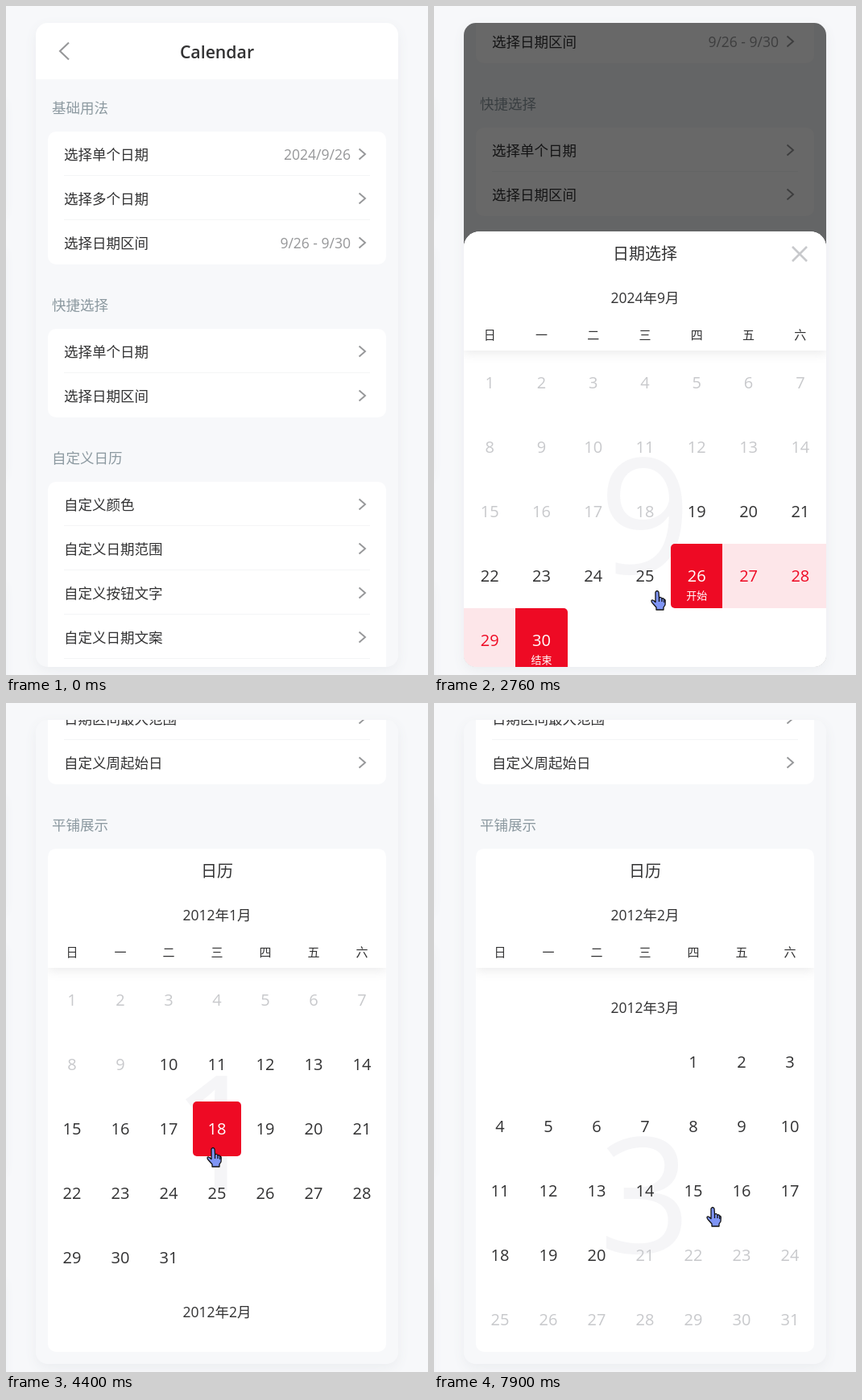
An HTML page for the animation above (8 s loop, 524 by 831 pixels).

```html
<!DOCTYPE html>
<html lang="zh-CN">
<head>
<meta charset="utf-8">
<title>Calendar</title>
<style>
  * { box-sizing: border-box; }
  html, body { margin: 0; width: 100%; height: 100%; overflow: hidden; }
  body {
    position: relative; background: #f7f8fa; color: #323233;
    font: 17.5px/55px 'Open Sans', 'Noto Sans CJK SC', 'Noto Sans CJK', sans-serif;
  }
  .side { position: absolute; left: -60px; width: 56px; box-shadow: 0 5px 15px #ebedf0; }
  .phone {
    position: absolute; left: 37px; top: 21px; width: 450px; height: 800px;
    border-radius: 15px; box-shadow: 0 5px 15px #ebedf0;
  }
  .screen { position: absolute; inset: 0; overflow: hidden; border-radius: 15px; background: #f7f8fa; }
  .nav {
    height: 70px; background: #fff; text-align: center;
    font-weight: 600; font-size: 21.25px; line-height: 71px;
  }
  .nav svg { position: absolute; left: 28px; top: 23px; }
  svg { fill: none; stroke: #969799; stroke-width: 1.9; overflow: visible; }
  h2 {
    margin: 0; padding: 23px 20px 0; height: 65px; line-height: 24px;
    font-size: 17.5px; font-weight: 400; color: rgba(69, 90, 100, .6);
  }
  .card + h2 { height: 80px; padding-top: 38px; }
  .card { margin: 0 15px; border-radius: 10px; background: #fff; overflow: hidden; }
  .row { position: relative; height: 55px; padding: 0 20px; line-height: 56px; }
  .row + .row::before {
    content: ''; position: absolute; left: 20px; right: 20px; top: -1px; height: 1px; background: #f4f5f6;
  }
  .row span { position: absolute; right: 44px; color: #969799; }
  .row svg { position: absolute; left: 386px; top: 21px; }
  .cal { position: relative; background: #fff; overflow: hidden; text-align: center; }
  .head {
    position: relative; z-index: 1; height: 147.5px; background: #fff;
    box-shadow: 0 2.5px 12.5px rgba(125, 126, 128, .16);
  }
  .head .name { height: 55px; font-size: 20px; line-height: 56px; }
  .week { display: grid; grid-template-columns: repeat(7, 1fr); font-size: 15px; line-height: 37px; }
  .grid { position: relative; display: grid; grid-template-columns: repeat(7, 1fr); grid-auto-rows: 80px; }
  .mark {
    position: absolute; inset: 0; display: flex; align-items: center; justify-content: center;
    font-size: 200px; line-height: 1; color: rgba(242, 243, 245, .8);
  }
  .day { position: relative; z-index: 0; font-size: 20px; line-height: 80px; }
  .off { color: #c8c9cc; }
  .picked { color: #fff; }
  .picked::before {
    content: ''; position: absolute; z-index: -1; inset: 6px 0; border-radius: 5px; background: #ee0a24;
  }
  .mid { color: #ee0a24; background: #fde6e9; }
  .start, .end { color: #fff; background: #ee0a24; }
  .start { border-radius: 5px 0 0 5px; }
  .end { border-radius: 0 5px 5px 0; }
  .day small {
    position: absolute; left: 0; right: 0; bottom: 7px; font-size: 13px; line-height: 18px;
  }
  .shade { position: absolute; inset: 0; background: rgba(0, 0, 0, .7); }
  .popup {
    position: absolute; left: 0; top: 160px; width: 450px; height: 640px;
    border-radius: 20px 20px 0 0; overflow: hidden; background: #fff;
  }
  .popup .cal { height: 577.5px; }
  .close { position: absolute; z-index: 2; left: 408px; top: 19px; }
  .btn {
    position: absolute; left: 20px; top: 586px; width: 410px; height: 45px;
    border-radius: 23px; background: #ee0a24; color: #fff; text-align: center; line-height: 45px;
  }
  .btn.down { background: #d60920; }
  #tiled { height: 625px; }
  .cursor { position: absolute; left: 0; top: 0; }
  .cursor path { stroke: #111; stroke-width: 1.3; stroke-linejoin: round; }
</style>
</head>
<body>
<div class="side" style="top:115px;height:140px"></div>
<div class="side" style="top:300px;height:280px"></div>
<div class="side" style="top:715px;height:200px"></div>
<div class="phone"><div class="screen">
  <div id="page"></div>
  <div class="shade" id="shade"></div>
  <div class="popup" id="popup">
    <svg class="close" width="18" height="18" style="stroke:#c8c9cc;stroke-width:2.6"><path d="M0 0 18 18M18 0 0 18"/></svg>
    <div class="cal" id="range"></div>
    <div class="btn" id="btn">完成</div>
  </div>
</div></div>
<svg class="cursor" id="cursor" width="1" height="1">
  <g id="hand">
    <path fill="#7f95f5" d="M-2 1Q0-2 2 1L2.5 8Q5 6.5 6 9Q8 8 8.7 10.3Q10.6 10 10.2 13L10 17 8 20V23H-1V20L-5 15.5Q-8 12.5-6.5 11Q-5 10-2 13.5Z"/>
    <path d="M2.5 8V13M6 9V13M8.7 10.3V14"/>
  </g>
  <path id="arrow" fill="#8a86b8" d="M0 0V16L4 12.5 6.8 18.5 9.5 17.2 6.8 11.5H12Z"/>
</svg>
<script>
const $ = id => document.getElementById(id);
const LOOP = 8000;

const row = (text, value = '', id = '') => `<div class="row">${text}
  <span id="${id}">${value}</span>
  <svg width="9" height="14"><path d="M.5 .5 8 7 .5 13.5"/></svg></div>`;
const card = (title, rows) => `<h2>${title}</h2><div class="card">${rows.join('')}</div>`;
const span = '9/26 - 9/30';

$('page').innerHTML = `<div class="nav">
    <svg width="14" height="22" style="stroke-width:2.1"><path d="M13 1.5 2 12 13 22.5"/></svg>Calendar</div>` +
  card('基础用法', [row('选择单个日期', '2024/9/26'), row('选择多个日期'), row('选择日期区间', span)]) +
  card('快捷选择', [row('选择单个日期'), row('选择日期区间')]) +
  card('自定义日历', [
    row('自定义颜色'), row('自定义日期范围'), row('自定义按钮文字', span, 'chosen'),
    row('自定义日期文案'), row('自定义弹出位置'), row('日期区间最大范围'), row('自定义周起始日')
  ]) +
  '<h2>平铺展示</h2><div class="card cal" id="tiled"></div>';

const label = (y, m) => `${y}年${m}月`;

// Month grid; info(day) gives the class and the note of a day.
function month(y, m, info, titled) {
  const first = new Date(y, m - 1, 1).getDay();
  const count = new Date(y, m, 0).getDate();
  let days = '';
  for (let d = 1; d <= count; d++) {
    const [cls, note] = info(d);
    const column = d === 1 ? ` style="grid-column-start:${first + 1}"` : '';
    days += `<div class="day ${cls}" data-day="${m}-${d}"${column}>${d}${note ? `<small>${note}</small>` : ''}</div>`;
  }
  return (titled ? `<div>${label(y, m)}</div>` : '') +
    `<div class="grid"><div class="mark">${m}</div>${days}</div>`;
}

const calendar = (name, title, months) => `<div class="head"><div class="name">${name}</div>
  <div class="sub">${title}</div>
  <div class="week">${[...'日一二三四五六'].map(c => `<div>${c}</div>`).join('')}</div></div>
  <div class="months">${months}</div>`;

const rangeInfo = d => d < 19 ? ['off'] : d === 26 ? ['start', '开始'] :
  d === 30 ? ['end', '结束'] : d > 26 ? ['mid'] : [''];
$('range').innerHTML = calendar('日期选择', label(2024, 9),
  month(2024, 9, rangeInfo) + month(2024, 10, () => [''], true));
$('tiled').innerHTML = calendar('日历', label(2012, 1),
  month(2012, 1, d => [d < 10 ? 'off' : '']) +
  month(2012, 2, () => [''], true) +
  month(2012, 3, d => [d > 20 ? 'off' : ''], true));

const months = $('tiled').querySelector('.months');
const sub = $('tiled').querySelector('.sub');
const dayCell = key => $('tiled').querySelector(`[data-day="${key}"]`);

// Keys are [time, value, ...]
const pageKeys = [[250, 0], [480, 125], [760, 250], [3065, 250], [3240, 375],
  [3460, 500], [3680, 625], [3900, 750], [4150, 875]];
const monthKeys = [[4440, 0], [4640, 125], [4850, 250], [5080, 375], [6730, 375],
  [6920, 500], [7200, 625], [7440, 750], [7640, 750], [7890, 833]];
const cursorKeys = [[50, 474, 840], [320, 300, 560], [800, 255, 482], [1230, 253, 482],
  [1420, 249, 547], [1750, 250, 535], [2000, 245, 620], [2390, 268, 782], [2680, 268, 782],
  [2760, 277, 727], [3060, 253, 579], [3700, 253, 579], [4150, 257, 553], [4420, 257, 553],
  [5100, 258, 566], [5230, 258, 566], [5500, 203, 688], [5620, 203, 688], [5850, 322, 690],
  [6150, 322, 690], [6700, 351, 628], [7200, 351, 628], [7700, 346, 627]];
const pickKeys = [[0, '1-10'], [4230, '1-18'], [5560, '2-21'], [5900, '2-23']];
const arrowKeys = [[0, false], [1260, true], [1850, false], [2080, true], [2330, false]];

const clamp = u => Math.min(1, Math.max(0, u));
const step = (keys, t) => keys.filter(k => k[0] <= t).pop()[1];

function track(keys, t, i = 1) {
  const n = keys.findIndex(k => k[0] > t);
  if (n < 0) return keys[keys.length - 1][i];
  if (n === 0) return keys[0][i];
  const a = keys[n - 1], b = keys[n];
  const u = (t - a[0]) / (b[0] - a[0]);
  return a[i] + (b[i] - a[i]) * u * u * (3 - 2 * u);
}

const moveY = (el, y) => { el.style.transform = `translateY(${y}px)`; };
let picked = '';

function draw() {
  const t = performance.now() % LOOP;
  moveY($('page'), -Math.round(track(pageKeys, t)));

  const scroll = Math.round(track(monthKeys, t));
  moveY(months, -scroll);
  const title = label(2012, scroll < 400 ? 1 : 2);
  if (sub.textContent !== title) sub.textContent = title;

  const pick = step(pickKeys, t);
  if (pick !== picked) {
    if (picked) dayCell(picked).classList.remove('picked');
    dayCell(pick).classList.add('picked');
    picked = pick;
  }

  // Sheet decelerates in and accelerates out.
  const open = t < 2000
    ? 1 - (1 - clamp((t - 1206) / 300)) ** 1.7
    : 1 - clamp((t - 2661) / 300) ** 1.7;
  moveY($('popup'), Math.round(640 * (1 - open)));
  $('popup').style.visibility = $('shade').style.visibility = open > 0 ? 'visible' : 'hidden';
  $('shade').style.opacity = open;
  $('btn').classList.toggle('down', t >= 2570 && t < 2660);
  $('chosen').style.visibility = t >= 2660 ? 'visible' : 'hidden';

  const arrow = step(arrowKeys, t);
  $('arrow').style.display = arrow ? '' : 'none';
  $('hand').style.display = arrow ? 'none' : '';
  const x = Math.round(track(cursorKeys, t)), y = Math.round(track(cursorKeys, t, 2));
  $('cursor').style.transform = `translate(${x}px, ${y}px)`;
  $('cursor').style.visibility = t < 50 ? 'hidden' : 'visible';
  requestAnimationFrame(draw);
}
draw();
</script>
</body>
</html>
```
